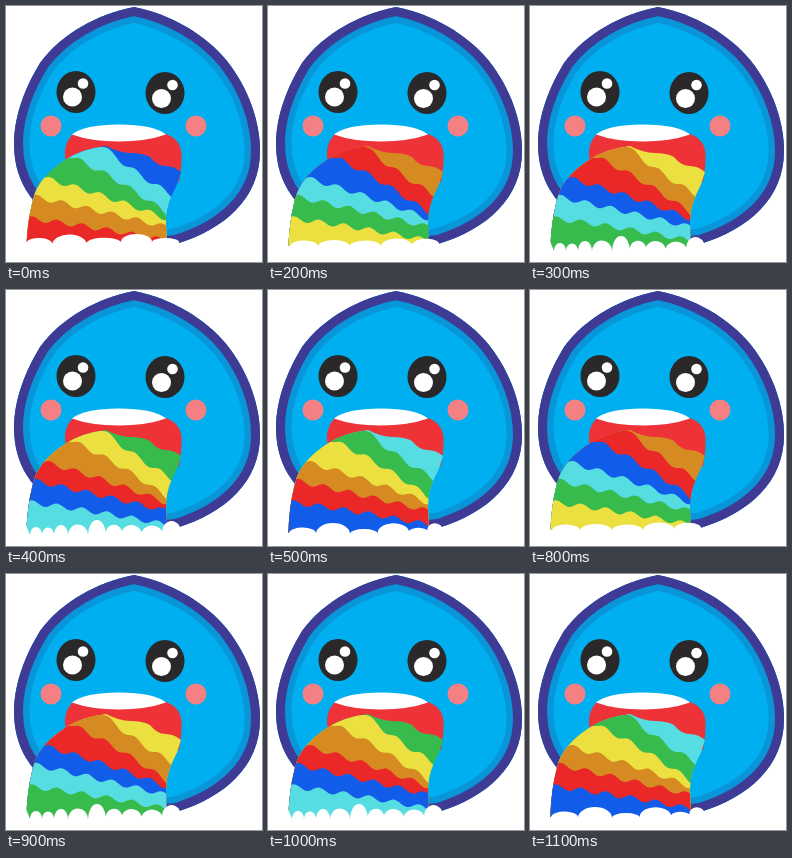
These frames come from a looping animation (256x256 px, 1200 ms). An HTML page:

```html
<!DOCTYPE html>
<html lang="en">
<head>
<meta charset="utf-8">
<title>Rainbow drop</title>
<style>
  html, body { margin: 0; width: 100%; height: 100%; overflow: hidden; background: #fff; }
  svg { display: block; width: 100vw; height: 100vh; }

  /* Colours step one band further down every 100 ms */
  .band { animation: flow 600ms step-end infinite; }
  @keyframes flow {
    0%, 100% { fill: #125cea; }
    16.666% { fill: #ea2828; }
    33.333% { fill: #d68b22; }
    50% { fill: #ebe03f; }
    66.666% { fill: #37bb4c; }
    83.333% { fill: #55dde2; }
  }

  .foam { fill: #fff; animation: foam 600ms step-end infinite; }
  @keyframes foam {
    0%, 100% { d: path("M0 256V237H20A13 6 0 0 1 46 239A17.5 11 0 0 1 81 240A17 6 0 0 1 115 236A15.5 8 0 0 1 146 236A13.5 4 0 0 1 173 236V256Z"); }
    33.333% { d: path("M0 256V240H22A14 6 0 0 1 50 241A16 7 0 0 1 82 241A15.5 6 0 0 1 113 240A16 8 0 0 1 145 241A13 6 0 0 1 171 237V256Z"); }
    50% { d: path("M0 256V235H20L24 245A6 8 0 0 1 36 245A6 7 0 0 1 48 244A7 10 0 0 1 62 246A10 11 0 0 1 82 245A9 15 0 0 1 100 245A8 8 0 0 1 116 241A9.5 8 0 0 1 135 246A11 10 0 0 1 157 245A8.5 9 0 0 1 174 237V256Z"); }
    83.333% { d: path("M0 256V243H21A13.5 6 0 0 1 48 244A17 11 0 0 1 82 244A14 5 0 0 1 110 244A15.5 9 0 0 1 141 241A9.5 4 0 0 1 160 243A7 6 0 0 1 174 237V256Z"); }
  }
</style>
</head>
<body>
<svg viewBox="0 0 256 256">
  <defs>
    <path id="body" d="M128 1C164 8 199 28 221 55C243 83 254 116 254 145C254 192 219 223 170 238C120 246 50 234 20 184C11 169 8 153 8 137C8 109 20 80 34 57C56 27 92 8 128 1Z"/>
    <path id="stream" d="M59 154Q75 143 100 140Q114 147 124 147Q137 147 144 151Q151 160 160 160Q168 160 175 166Q172 178 166 189Q160 202 160 217L161 250H20L21 230Q23 205 29 187Q36 169 59 154Z"/>
    <clipPath id="inBody"><use href="#body"/></clipPath>
    <clipPath id="inStream"><use href="#stream"/></clipPath>
  </defs>

  <g clip-path="url(#inBody)" stroke-linejoin="miter">
    <use href="#body" fill="#00aff0" stroke="#0896d8" stroke-width="31"/>
    <use href="#body" fill="none" stroke="#3f3a94" stroke-width="18"/>
  </g>

  <g fill="#2a2829">
    <ellipse cx="70" cy="86" rx="19.5" ry="21"/>
    <ellipse cx="159" cy="87" rx="19.5" ry="21"/>
  </g>
  <g fill="#fff">
    <circle cx="66.5" cy="91" r="9.5"/>
    <circle cx="77" cy="77.5" r="5.3"/>
    <circle cx="155.5" cy="92.5" r="9.5"/>
    <circle cx="166.5" cy="79" r="5.3"/>
  </g>
  <g fill="#f58084">
    <circle cx="45" cy="120" r="10.5"/>
    <circle cx="190" cy="120" r="10.5"/>
  </g>

  <path fill="#ee3338" d="M67 128Q113 122 160 128Q174 133 175.500 147Q176 160 173 176L100 180L60 156Q56 139 67 128Z"/>
  <path fill="#fff" d="M66 128.500Q78 118.500 113 118.500Q148 118.500 160 128.500Q140 135.500 113 135.500Q85 135.500 66 128.500Z"/>

  <g id="bands" clip-path="url(#inStream)"></g>
  <path class="foam"/>
</svg>
<script>
  // Upper edge of each band: start, control and end of a curve that carries a ripple
  const edges = [
    [98, 141, 122, 163, 171, 192],
    [68, 152, 112, 172, 162, 208],
    [38, 172, 100, 189, 161, 213],
    [25, 190, 90, 204, 161, 221],
    [20, 212, 92, 221, 162, 235]
  ];
  const steps = 60;
  const wavelength = 25;

  const mix = (a, b, c, t) => (1 - t) ** 2 * a + 2 * t * (1 - t) * b + t * t * c;

  function bandPath([x0, y0, cx, cy, x1, y1]) {
    let d = `M0 256V${y0}`;
    for (let i = 0; i <= steps; i++) {
      const t = i / steps;
      const x = mix(x0, cx, x1, t);
      const ripple = -2.5 * Math.sin(2 * Math.PI * (x - x0) / wavelength);
      d += `L${x.toFixed(1)} ${(mix(y0, cy, y1, t) + ripple).toFixed(1)}`;
    }
    return d + "H256V256Z";
  }

  const shapes = ["M0 0H256V256H0Z", ...edges.map(bandPath)];
  document.getElementById("bands").innerHTML = shapes.map((d, k) =>
    `<path class="band" d="${d}" style="animation-delay:${(k - 6) * 100}ms"/>`
  ).join("");
</script>
</body>
</html>
```
